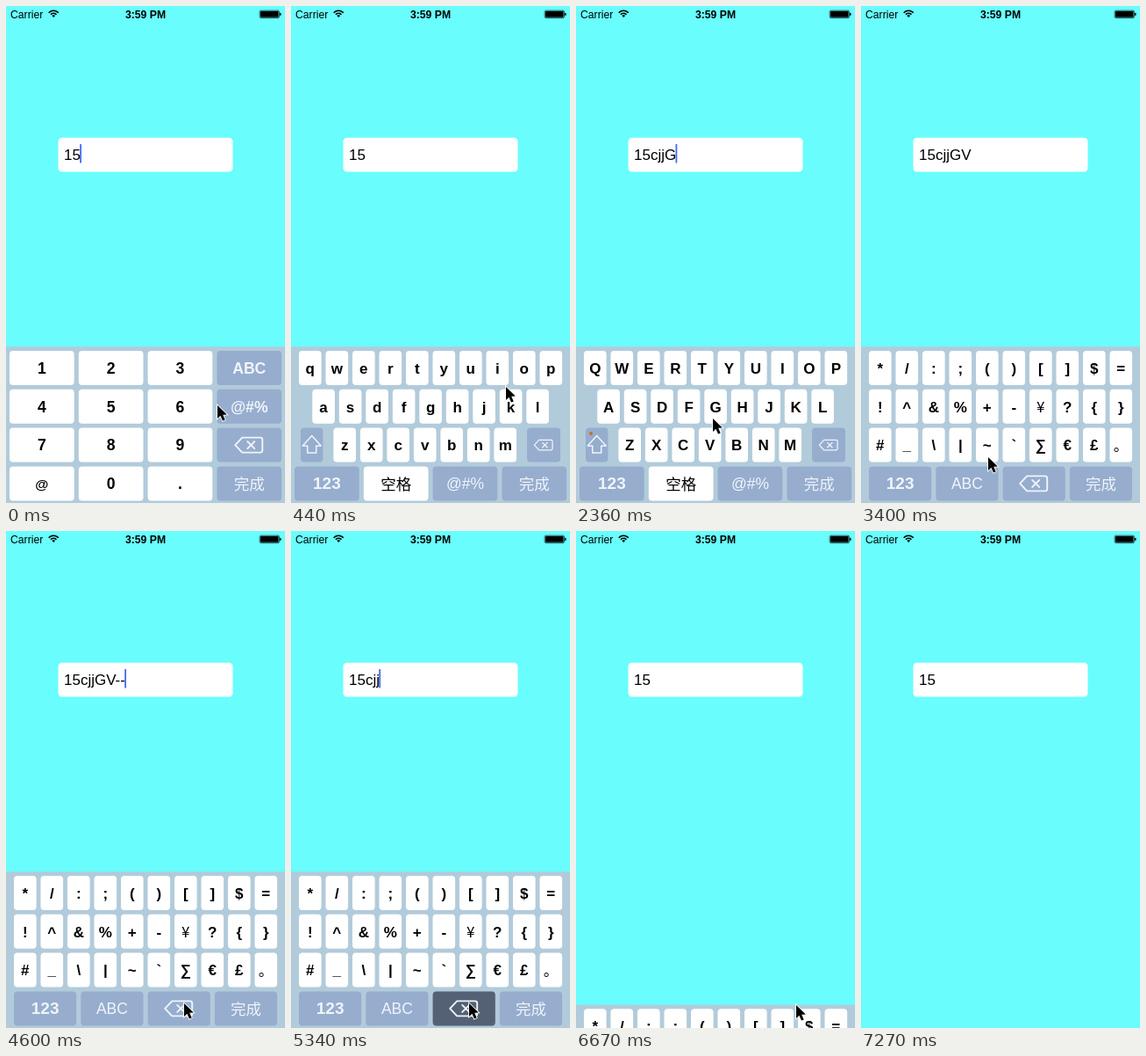
Write an HTML page with a canvas that moves like this. It is 318 by 565 pixels and loops after 7.91 s.

```html
<!DOCTYPE html>
<html lang="zh">
<head>
<meta charset="utf-8">
<title>Custom keyboard</title>
<style>
html, body { margin: 0; width: 100%; height: 100%; overflow: hidden; background: #69fdfd; }
canvas { display: block; width: 318px; height: 565px; }
</style>
</head>
<body>
<canvas id="stage"></canvas>
<script>
const W = 318, H = 565, LOOP = 7910, STEP = 148.4, LAST = 49;
const SANS = '"Liberation Sans", Arial, sans-serif';
const CJK = '"Noto Sans CJK SC", "Noto Sans CJK", sans-serif';
const BLUE = '#96adce', PALE = '#f0f4fa';
const canvas = document.getElementById('stage');
const ctx = canvas.getContext('2d');
const dpr = window.devicePixelRatio || 1;
canvas.width = W * dpr;
canvas.height = H * dpr;

// [step, x, y] of the pointer tip
const path = [
  [0, 241, 454], [1, 266, 416], [2, 264, 417], [3, 245, 433], [5, 124, 499], [7, 122, 499],
  [9, 219, 460], [11, 219, 460], [13, 24, 499], [14, 26, 498], [15, 156, 466], [16, 156, 469],
  [17, 153, 495], [18, 153, 496], [20, 198, 541], [21, 196, 541], [23, 145, 513],
  [25, 172, 459], [28, 172, 459], [30, 198, 531], [31, 203, 537], [41, 203, 537],
  [43, 251, 539], [46, 251, 539], [47, 266, 531], [48, 301, 548], [49, 340, 590]
];
const typed = [
  [0, '15'], [7, '15c'], [10, '15cj'], [11, '15cjj'], [16, '15cjjG'], [18, '15cjjGV'],
  [27, '15cjjGV-'], [28, '15cjjGV--'], [32, '15cjjGV-'], [33, '15cjjGV'], [34, '15cjjG'],
  [35, '15cjj'], [37, '15cj'], [40, '15c'], [41, '15']
];
const layouts = [[0, 'digits'], [2, 'lower'], [14, 'upper'], [21, 'symbols']];
const slide = [[43, 0], [44, 0.25], [45, 0.85], [46, 1]];
const presses = new Set([1, 6, 10, 13, 15, 17, 20, 26, 32, 34, 36, 39, 43]);

const current = (list, n) => list.filter(e => e[0] <= n).pop()[1];

function tween(list, n, k) {
  if (n <= list[0][0]) return list[0][k];
  for (let i = 1; i < list.length; i++) {
    const a = list[i - 1], b = list[i];
    if (n <= b[0]) return a[k] + (b[k] - a[k]) * (n - a[0]) / (b[0] - a[0]);
  }
  return list[list.length - 1][k];
}

function box(x, y, w, h, r, color) {
  ctx.fillStyle = color;
  ctx.beginPath();
  ctx.roundRect(x, y, w, h, r);
  ctx.fill();
}

function text(s, x, y, font, color = '#000', align = 'center') {
  ctx.font = font;
  ctx.fillStyle = color;
  ctx.textAlign = align;
  ctx.fillText(s, x, y);
}

function poly(points, close = true) {
  ctx.beginPath();
  points.forEach(([x, y]) => ctx.lineTo(x, y));
  if (close) ctx.closePath();
}

function eraseIcon(cx, cy, s) {
  ctx.save();
  ctx.translate(cx, cy);
  ctx.scale(s, s);
  ctx.strokeStyle = PALE;
  ctx.lineWidth = 1.9;
  ctx.lineJoin = ctx.lineCap = 'round';
  ctx.beginPath();
  ctx.moveTo(-16, 0);
  ctx.lineTo(-8, -8.5);
  ctx.arcTo(15, -8.5, 15, 0, 2.5);
  ctx.arcTo(15, 8.5, 0, 8.5, 2.5);
  ctx.lineTo(-8, 8.5);
  ctx.closePath();
  ctx.stroke();
  poly([[-2, -4], [6, 4]], false);
  ctx.stroke();
  poly([[6, -4], [-2, 4]], false);
  ctx.stroke();
  ctx.restore();
}

function shiftIcon(cx, cy, on) {
  ctx.save();
  ctx.translate(cx, cy);
  ctx.strokeStyle = PALE;
  ctx.lineWidth = 1.5;
  ctx.lineJoin = 'round';
  poly([[0, -10.5], [10.5, 1], [5, 1], [5, 9], [-5, 9], [-5, 1], [-10.5, 1]]);
  ctx.stroke();
  if (on) box(-8.7, -15, 4, 4, 2, '#c0722f');
  ctx.restore();
}

const rowY = r => 392 + 43.8 * r;

function makeKey(label, x, row, w, opt = {}) {
  return { label, x, y: rowY(row), w, h: 39, size: 17, weight: 'bold', ...opt };
}

function letterRow(chars, x, row) {
  return [...chars].map((c, i) => makeKey(c, x + 30.5 * i, row, 25.6));
}

function bottomRow(labels, x, step, w) {
  return labels.map((s, i) => makeKey(s, x + step * i, 3, w, {
    blue: s !== '空格', size: s === '123' ? 19 : 17.5,
    weight: s === '123' ? 'bold' : 'normal'
  }));
}

function buildKeys(name) {
  if (name === 'digits') {
    const rows = [['1', '2', '3', 'ABC'], ['4', '5', '6', '@#%'], ['7', '8', '9', 'erase'], ['@', '0', '.', '完成']];
    return rows.flatMap((row, r) => row.map((s, c) => makeKey(s, 4 + 78.8 * c, r, 73.7, {
      blue: c === 3, size: s === '@' ? 15.5 : 17.6, weight: s === '完成' ? 'normal' : 'bold'
    })));
  }
  if (name === 'symbols') {
    return [
      ...['*/:;()[]$=', '!^&%+-¥?{}', '#_\\|~`∑€£。'].flatMap((s, r) => letterRow(s, 9, r)),
      ...bottomRow(['123', 'ABC', 'erase', '完成'], 9, 76.3, 71.2)
    ];
  }
  const up = name === 'upper';
  const row = (s, x, r) => letterRow(up ? s.toUpperCase() : s, x, r);
  return [
    ...row('qwertyuiop', 9, 0), ...row('asdfghjkl', 24.3, 1), ...row('zxcvbnm', 48.4, 2),
    makeKey('shift', 11, 2, 25.5, { blue: true, on: up }),
    makeKey('erase', 269, 2, 38, { blue: true, small: true }),
    ...bottomRow(['123', '空格', '@#%', '完成'], 4, 78.8, 73.7)
  ];
}

const boards = {};
for (const name of ['digits', 'lower', 'upper', 'symbols']) boards[name] = buildKeys(name);

function drawKey(k, px, py, pressed) {
  const cx = k.x + k.w / 2, cy = k.y + k.h / 2;
  box(k.x, k.y, k.w, k.h, 4, k.blue ? BLUE : '#fff');
  const hit = px >= k.x && px <= k.x + k.w && py >= k.y && py <= k.y + k.h;
  if (pressed && hit) box(k.x, k.y, k.w, k.h, 4, 'rgba(0,0,0,.44)');
  if (k.label === 'erase') return eraseIcon(cx, cy, k.small ? 0.67 : 1);
  if (k.label === 'shift') return shiftIcon(cx, cy, k.on);
  const cjk = /[完空。¥]/.test(k.label);
  const font = `${cjk ? 'normal' : k.weight} ${k.size}px ${cjk ? CJK : SANS}`;
  text(k.label, cx, cy + (cjk ? 6.6 : 6.3), font, k.blue ? PALE : '#000');
}

function drawStatus() {
  text('Carrier', 5, 13.5, `12.2px ${SANS}`, '#000', 'left');
  text('3:59 PM', 159, 13.5, `bold 12.2px ${SANS}`);
  ctx.strokeStyle = '#000';
  ctx.lineWidth = 1.6;
  ctx.lineCap = 'butt';
  for (const r of [4.3, 7.3]) {
    ctx.beginPath();
    ctx.arc(54.2, 12.6, r, -Math.PI * 0.77, -Math.PI * 0.23);
    ctx.stroke();
  }
  ctx.fillStyle = '#000';
  ctx.beginPath();
  ctx.moveTo(54.2, 13);
  ctx.arc(54.2, 12.6, 2.4, -Math.PI * 0.77, -Math.PI * 0.23);
  ctx.fill();
  ctx.lineWidth = 0.7;
  ctx.beginPath();
  ctx.roundRect(289.2, 5.2, 22.2, 8.4, 1.5);
  ctx.stroke();
  box(290, 6, 20.6, 6.8, 0.7, '#000');
  box(312.1, 7.8, 1.4, 3.2, 0.7, '#000');
}

function drawField(value, caret) {
  box(59.5, 149.8, 199, 38.6, 4.2, '#fff');
  text(value, 66, 174.5, `17px ${SANS}`, '#000', 'left');
  if (caret) {
    const x = 66 + ctx.measureText(value).width;
    box(x - 0.7, 157, 1.8, 21.5, 0.5, '#426bf2');
  }
}

function drawPointer(x, y) {
  ctx.save();
  ctx.translate(x, y);
  poly([[0, 0], [0, 15], [3.4, 11.8], [6, 17.6], [8.7, 16.4], [6.2, 10.8], [10.8, 10.6]]);
  ctx.lineJoin = 'miter';
  ctx.strokeStyle = '#fff';
  ctx.lineWidth = 1.7;
  ctx.stroke();
  ctx.fillStyle = '#000';
  ctx.fill();
  ctx.restore();
}

function caretOn(n) {
  return !(n >= 2 && n <= 4) && !(n >= 21 && n <= 23) && n < 44;
}

function draw(t) {
  const n = Math.min(LAST, Math.floor((t + 16) / STEP));
  const px = tween(path, n, 1), py = tween(path, n, 2);
  const drop = tween(slide, n, 1) * 178;
  ctx.setTransform(dpr, 0, 0, dpr, 0, 0);
  ctx.fillStyle = '#69fdfd';
  ctx.fillRect(0, 0, W, H);
  drawStatus();
  drawField(current(typed, n), caretOn(n));
  if (drop < 178) {
    ctx.save();
    ctx.translate(0, drop);
    ctx.fillStyle = '#b2cbdb';
    ctx.fillRect(0, 387.3, W, 178);
    for (const k of boards[current(layouts, n)]) drawKey(k, px, py, presses.has(n));
    ctx.restore();
  }
  if (n < LAST) drawPointer(px, py);
}

const start = performance.now();
function tick() {
  draw((performance.now() - start) % LOOP);
  requestAnimationFrame(tick);
}
tick();
</script>
</body>
</html>
```
